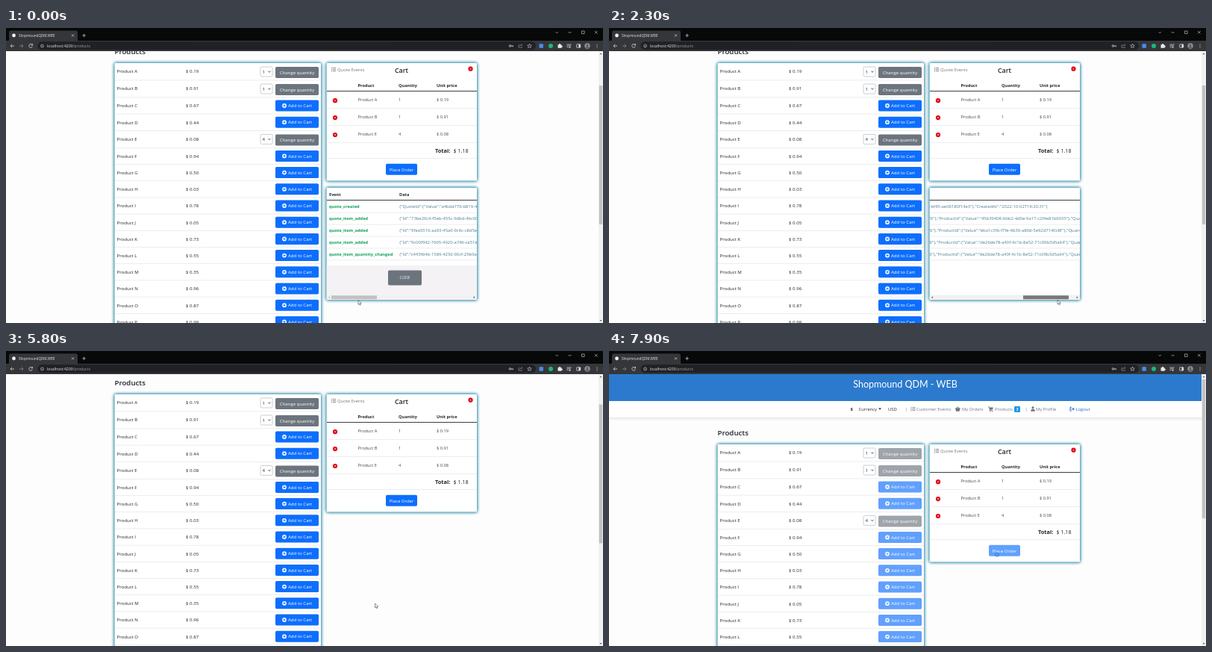
Recreate the animation shown at these times as an HTML page. Size 800 px wide and 395 px high, loop 8 s.

```html
<!DOCTYPE html>
<html lang="en">
<head>
<meta charset="utf-8">
<title>Shop cart</title>
<style>
html, body { margin: 0; width: 100%; height: 100%; overflow: hidden; background: #fdfdfe; }
svg { display: block; }
text { font-family: "Open Sans", "Noto Sans", sans-serif; white-space: pre; }
.card { filter: drop-shadow(0 0 2px #1b86a6) drop-shadow(0 0 .6px #3d8ea6); }
.nav { filter: drop-shadow(0 1px 2px #0002); }
</style>
</head>
<body>
<svg id="stage" width="100%" height="100%" viewBox="0 0 800 395"></svg>
<script>
const INK = '#212529', GRAY = '#6c757d', BLUE = '#0d6efd', RULE = '#dfe2e6', RED = '#e00613';

// Markup helpers; text is placed by its vertical centre.
const rect = (x, y, w, h, fill, r = 0, extra = '') =>
  `<rect x="${x}" y="${y}" width="${w}" height="${h}" rx="${r}" fill="${fill}" ${extra}/>`;
const text = (x, y, str, size = 6.1, fill = INK, weight = 400, extra = '') =>
  `<text x="${x}" y="${y + size * .36}" font-size="${size}" fill="${fill}" font-weight="${weight}" ${extra}>${str}</text>`;
const line = (d, color, width = .8, extra = '') =>
  `<path d="${d}" fill="none" stroke="${color}" stroke-width="${width}" ${extra}/>`;
const shape = (d, fill, extra = '') => `<path d="${d}" fill="${fill}" ${extra}/>`;
const dot = (x, y, r, fill, extra = '') => `<circle cx="${x}" cy="${y}" r="${r}" fill="${fill}" ${extra}/>`;
const group = (body, attrs = '') => `<g ${attrs}>${body}</g>`;
const rule = (x, y, w, color = RULE, h = .6) => rect(x, y, w, h, color);
const MIDDLE = 'text-anchor="middle"';

const button = (x, y, w, h, fill, body, attrs = '') =>
  group(rect(x, y, w, h, fill, 1.7) + body, attrs);
const listIcon = (x, y, color) =>
  [-2, 0, 2].map(d => rect(x, y + d - .5, 1.1, 1, color) + rect(x + 1.9, y + d - .4, 4.2, .8, color)).join('');
const removeIcon = (x, y) => dot(x, y, 3.1, RED) +
  line(`M${x - .9} ${y - .9}l1.8 1.8m0-1.8l-1.8 1.8`, '#fff', .6);

function productList() {
  const prices = [19, 91, 67, 44, 8, 94, 50, 3, 78, 5, 73, 55, 35, 96, 87, 99];
  const picked = { 0: 1, 1: 1, 4: 4 };
  let y = 125, out = rect(145.5, 125, 276.5, 420, '#fff', 1, 'class="card"');
  prices.forEach((cents, i) => {
    const mid = y + 11.3, qty = picked[i];
    out += text(148.5, mid, 'Product ' + String.fromCharCode(65 + i));
    out += text(241, mid, '$ ' + (cents / 100).toFixed(2));
    if (qty) {
      out += rect(341, y + 5, 16, 13, '#fff', 1.5, 'stroke="#b5bbc1" stroke-width=".7"');
      out += text(343.5, mid + .2, qty);
      out += line(`M351.3 ${y + 10.7}l1.6 1.6 1.6-1.6`, '#343a40', .9);
      out += button(361, y + 5, 58, 15, GRAY, text(390, y + 12.9, 'Change quantity', 6.1, '#fff', 400, MIDDLE), 'class="order"');
    } else {
      const c = y + 11;
      out += button(361, y + 3.5, 58, 15, BLUE,
        dot(373, c, 2.9, '#fff') + line(`M371.3 ${c}h3.4m-1.7-1.7v3.4`, BLUE, .9) +
        text(378, c, 'Add to Cart', 6.1, '#fff'), 'class="order"');
    }
    y += qty ? 23 : 22.2;
    out += rule(146, y - .4, 276);
  });
  return out;
}

function cart() {
  let out = rect(429.5, 125, 201.5, 157.5, '#fff', 1, 'class="card"');
  out += listIcon(436, 133.5, GRAY) + text(444, 133.5, 'Quote Events', 5.85, GRAY);
  out += text(530, 135, 'Cart', 8.8, INK, 600, MIDDLE) + removeIcon(622.5, 132.7);
  [[471.5, 'Product'], [526, 'Quantity'], [577, 'Unit price']]
    .forEach(([x, label]) => out += text(x, 155, label, 5.6, INK, 700));
  out += rule(430, 162, 201, '#3a3f44', 1);
  [['A', 1, '0.19'], ['B', 1, '0.91'], ['E', 4, '0.08']].forEach(([name, qty, price], i) => {
    const y = 174.3 + i * 22.9;
    out += removeIcon(441, y + .9) + text(471.5, y, 'Product ' + name, 5.7, '#41464b');
    out += text(526, y, qty, 5.7, '#41464b') + text(577, y, '$ ' + price, 5.7, '#41464b');
    out += rule(430, y + 11, 201);
  });
  out += text(575, 242.5, 'Total:', 7.4, INK, 700) + text(599.5, 242.5, '$ 1.18', 7.1);
  out += rule(430, 252.3, 201);
  return out + button(509, 259.8, 42, 15, BLUE,
    text(530, 267.5, 'Place Order', 6, '#fff', 400, MIDDLE), 'id="place" class="order"');
}

function eventPanel() {
  const quote = '"QuoteId":{"Value":"a4bda776-b819-43ae-917b-8f6327ae8276"}';
  const item = (id, product, qty) => `{"Id":"${id}",${quote},"ProductId":{"Value":"${product}"},"Quantity":${qty}}`;
  const gadget = 'de26de78-a40f-4c1b-8e52-71c09b3d5a64';
  const events = [
    ['quote_created', `{${quote},"CustomerId":{"Value":"dcec6a74-6854-4241-bf45-ae06180f14e3"},"CreatedAt":"2022-10-02T14:20:31"}`],
    ['quote_item_added', item('73be20c4-f5eb-455c-9dbd-46c00de13d32', '45b39408-6bb2-4d0e-9a17-c2f4e81b6035', 1)],
    ['quote_item_added', item('9fea5510-aa93-45a0-9c6c-c8d5e5dbdd77', 'eba1c3fb-f7fe-4b36-a80d-5e92d7140c8f', 1)],
    ['quote_item_added', item('9c00f942-7605-4920-a746-ce51e5244a2a', gadget, 1)],
    ['quote_item_quantity_changed', item('c445fb4b-1589-4256-90cf-29b9ade33605', gadget, 4)]
  ];
  let body = text(3.5, 8.7, 'Event', 5.6, INK, 700) + text(97.5, 8.7, 'Data', 5.6, INK, 700);
  body += rule(0, 16, 619, '#3a3f44', 1);
  events.forEach(([name, data], i) => {
    const y = 25 + i * 15.9;
    body += text(3.5, y, name, 5.7, '#12a05a', 700) + text(97.5, y, data, 5.87, '#4b7d93');
    body += rule(0, y + 7.9, 619);
  });
  body += rect(0, 104, 201.5, 39.5, '#f4f2f4');
  body += button(82.5, 110.5, 45, 20, GRAY, text(105, 120.7, 'CLOSE', 4.6, '#fff', 400, MIDDLE), 'id="close"');
  const bar = rect(0, 143.5, 201.5, 6.5, '#f1f1f1') + rect(6.5, 144.2, 61, 5, '#c1c1c1', 0, 'id="thumb"') +
    shape('M4.3 145.2v3l-1.7-1.5z', '#505050', 'id="leftArrow"') + shape('M197.2 145.2v3l1.7-1.5z', '#505050');
  return group(rect(429.5, 292, 201.5, 150, '#fff', 1, 'class="card"') +
    `<svg x="429.5" y="292" width="201.5" height="150">${group(body, 'id="events"')}${bar}</svg>`, 'id="panel"');
}

function siteHeader() {
  const nav = (x, label, color = GRAY, weight = 400) => text(x, 77.7, label, 5.85, color, weight);
  return rect(0, 67, 800, 22, '#fff', 0, 'class="nav"') + rect(0, 20, 800, 47, '#2c7acd') +
    text(397, 44, 'Shopmound QDM - WEB', 12.5, '#fff', 400, MIDDLE + ' style="font-family:Lato,sans-serif"') +
    nav(323.5, '$', INK, 700) + nav(334.5, 'Currency', INK) + shape('M361 76.5h4l-2 2.2z', INK) + nav(374, 'USD', INK) +
    nav(396.5, '|') + listIcon(404.5, 77.7, GRAY) + nav(412, 'Customer Events') +
    shape('M464 76.5h1.2l1.6-2 .6.5-1 1.5h2l-1-1.5.6-.5 1.6 2h1.2v1l-.6.2-.6 3h-4.6l-.6-3-.6-.2z', GRAY) + nav(473, 'My Orders') +
    shape('M508 74.6h1.6l.4.8h4.8l-.8 3.2h-3.4l.2.7h3v.7h-3.7l-1-4.7h-1.1z', GRAY) + dot(510.8, 80.7, .7, GRAY) + dot(513.6, 80.7, .7, GRAY) +
    nav(517, 'Products') + rect(543, 74, 8, 8, '#2196e3', 1.2) + text(547, 78, '3', 4.6, '#fff', 700, MIDDLE) +
    nav(557.5, '|') + dot(568, 75.9, 1.6, GRAY) + shape('M565.2 80.8q0-2.8 2-2.8h1.6q2 0 2 2.8z', GRAY) + nav(572, 'My Profile') +
    line('M619.8 75.3h-1.8v4.8h1.8M619.6 77.7h3.6m-1.6-1.7l1.7 1.7-1.7 1.7', '#1766c8', 1) + nav(625.5, 'Logout', '#1766c8');
}

function browser() {
  const pale = '#d5d7da', bar = '#35363a';
  return rect(0, 0, 800, 18, '#070808') + shape('M2 17.5q2 0 2-2V6q0-2.5 2.5-2.5h87Q96 3.500 96 6v9.500q0 2 2 2z', bar) +
    dot(10.5, 10, 2.4, '#f1f1f1') + text(17, 10, 'ShopmoundQDM.WEB', 4.6, '#e8eaed') +
    line('M88 8.500l3 3m0-3l-3 3M102.300 10h4.600m-2.300-2.300v4.600', pale, .7) +
    line('M736.500 5.200l1.700 1.700 1.700-1.700M753.500 6h4M771.500 4h3.600v3.600h-3.600zM789 4l3.600 3.600m0-3.600l-3.600 3.600', pale, .6) +
    rect(0, 17, 800, 14, bar) + rect(42.5, 18.3, 667.5, 11, '#202124', 5.5) +
    line('M11 24H6.200m2-2.200L6 24l2.200 2.200', pale, .8) + line('M18 24h4.800m-2-2.200l2.200 2.200-2.200 2.200', '#8a8d91', .8) +
    line('M35 22.300a2.400 2.400 0 1 0 .5 2.200M35.500 21v2h-2', pale, .8) +
    dot(48.5, 24, 2, 'none', `stroke="${pale}" stroke-width=".6"`) + line('M48.500 23.600v1.500', pale, .6) +
    text(55, 24, 'localhost:4200<tspan fill="#9aa0a6">/products</tspan>', 5.15, '#e8eaed') +
    dot(675.5, 24, 1.3, 'none', `stroke="${pale}" stroke-width=".8"`) + line('M677 24h3m-.8 0v1.300', pale, .8) +
    line('M688.500 22.800h-1.500v3.400h4.500v-1.200M688.800 24.600q.3-2 2.700-2m-1-1.200l1.200 1.200-1.200 1.200', '#9aa0a6', .6) +
    line('M701.500 21.200l.8 1.900 2 .1-1.500 1.300.5 2-1.800-1.100-1.800 1.100.5-2-1.500-1.300 2-.1z', pale, .6) +
    rect(714.5, 21.3, 5.4, 5.4, '#4a8cf0', .6) + dot(730, 24, 3, '#17b978') +
    shape('M739.500 22.300h1.600a1 1 0 1 1 1.900 0h1.500v1.500a1 1 0 1 1 0 1.900v1h-5z', '#e8eaed') +
    line('M751.500 22h4m-4 1.700h4m-4 1.700h2.300M756 26v-4h1.500', pale, .7) + dot(755.4, 26, .9, pale) +
    rect(764.7, 21.8, 5, 4.4, 'none', .5, 'stroke="#e8eaed" stroke-width=".7"') + rect(767.5, 22, 2.1, 4, '#e8eaed') +
    dot(779, 24, 3.7, '#8d9094') + dot(779, 22.9, 1.2, '#4c4f54') + shape('M776.700 26.500q0-2 2.300-2t2.300 2z', '#4c4f54') +
    [22, 24, 26].map(y => dot(792, y, .6, pale)).join('');
}

const pageScrollbar = rect(794, 31, 6, 364, '#f1f1f1') + rect(794.8, 38, 4.4, 186, '#c1c1c1', 0, 'id="pageThumb"') +
  shape('M795.500 35.300h3l-1.500-1.700z', '#505050') + shape('M795.500 391h3l-1.500 1.700z', '#505050');

const outlined = 'stroke="#222" stroke-width=".5"';
const pointers =
  shape('M0 0V5.800L1.400 4.600 2.300 6.600 3.300 6.200 2.400 4.200H4.200Z', '#fff', `id="arrow" ${outlined}`) +
  line('M-1.200-3.400h2.400M0-3.400v6.800M-1.200 3.400h2.400', '#222', .6, 'id="beam"') +
  shape('M0 0q.8 0 .8.8v1.800l2.500.6q.7.200.6 1l-.5 2.600h-3.500L-2 4.100q.4-.8 1.200-.1V.8Q-.8 0 0 0z', '#fff', `id="hand" ${outlined}`) +
  dot(0, 0, 2.3, 'none', 'id="busy" stroke="#2b86e6" stroke-width="1.3"');

stage.innerHTML = rect(0, 0, 800, 395, '#fdfdfe') +
  group(siteHeader() + text(145.5, 110, 'Products', 9.7, INK, 600) + productList() + cart() + eventPanel(), 'id="page"') +
  pageScrollbar + browser() + group(pointers, 'id="cursor"');

// Steps: [time, value, ...], linear between.
const dragSteps = [[200, 0], [300, 3], [400, 12], [600, 32], [700, 32], [800, 37], [1100, 57], [1500, 91.5], [1600, 98],
  [1700, 103], [2100, 126], [2200, 126], [2300, 119], [2600, 60], [2900, 20.5], [3100, 11], [3400, 11], [3500, 5], [3600, 0]];
const scrollSteps = [[5600, 78], [5700, 75], [5800, 67], [5900, 36], [6000, 36], [6100, 25], [6200, 8], [6300, 0]];
const cursorSteps = [[4000, 472, 361], [4100, 478, 301], [4500, 478, 301], [4600, 506, 320], [4700, 533, 334], [5500, 533, 334],
  [5700, 494.5, 338], [6000, 494.5, 338], [6300, 502, 180], [6500, 502, 180], [6600, 506, 95.5], [6700, 506, 95.5],
  [6800, 508, 112], [7100, 516, 205], [7300, 520, 268], [7600, 520, 268], [7700, 520, 272.5]];

function at(steps, t, col = 1) {
  const i = steps.findIndex(s => s[0] > t);
  if (i < 0) return steps[steps.length - 1][col];
  if (i === 0) return steps[0][col];
  const a = steps[i - 1], b = steps[i];
  return a[col] + (b[col] - a[col]) * (t - a[0]) / (b[0] - a[0]);
}

const el = id => document.getElementById(id);
const move = (id, x, y) => el(id).setAttribute('transform', `translate(${x} ${y})`);
const paint = (id, color) => el(id).setAttribute('fill', color);
const buttons = [...document.querySelectorAll('.order')];

function draw(t) {
  const drag = at(dragSteps, t), scroll = at(scrollSteps, t);
  move('page', 0, -scroll);
  move('pageThumb', 0, scroll / 2);
  move('events', -drag * 3.31, 0);
  move('thumb', drag, 0);
  paint('thumb', t >= 300 && t < 4100 ? '#787878' : '#c1c1c1');
  paint('leftArrow', drag > 0 ? '#505050' : '#b0b0b0');
  el('panel').style.display = t < 5500 ? '' : 'none';
  el('close').firstChild.setAttribute('fill', t < 4700 ? GRAY : t < 5100 ? '#5c636a' : '#565e64');
  el('place').firstChild.setAttribute('fill', t >= 7300 && t < 7500 ? '#0b5ed7' : BLUE);
  buttons.forEach(b => b.setAttribute('opacity', t < 7500 ? 1 : .65));

  const dragging = t < 4100;
  move('cursor', dragging ? 472 + drag * 1.085 : at(cursorSteps, t, 1),
    dragging ? at([[2200, 364.5], [2900, 362]], t) : at(cursorSteps, t, 2));
  const look = t >= 7700 ? 'busy' : t >= 4100 && t < 4600 ? 'beam' :
    (t >= 4700 && t < 5500) || (t >= 7300 && t < 7500) ? 'hand' : 'arrow';
  ['arrow', 'beam', 'hand', 'busy'].forEach(id => el(id).style.display = id === look ? '' : 'none');
}

const start = performance.now();
function tick() {
  const t = (performance.now() - start) % 8000;
  draw(Math.floor(t / 100) * 100);
  requestAnimationFrame(tick);
}
tick();
</script>
</body>
</html>
```
